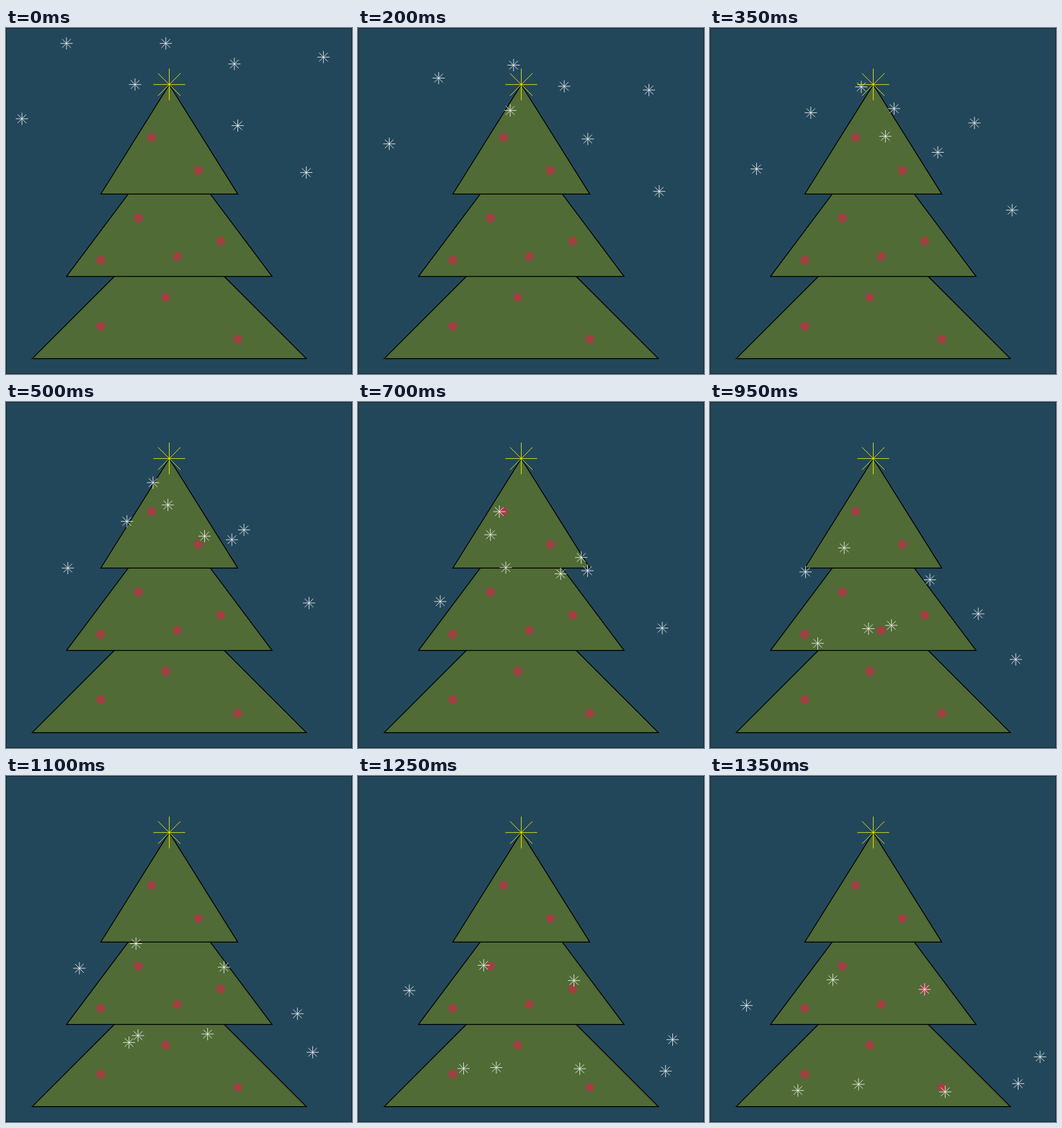
These frames come from a looping animation (480x480 px, 1.5 s). An HTML page with a canvas:

```html
<!DOCTYPE html>
<html>
<head>
<meta charset="utf-8">
<style>
  html, body { margin: 0; height: 100%; overflow: hidden; background: #23475a; }
  canvas { display: block; }
</style>
</head>
<body>
<canvas id="stage" width="480" height="480"></canvas>
<script>
const ctx = document.getElementById('stage').getContext('2d');
const LOOP = 1500, STEP = 50, STEPS = 26;

// Plot units: the tree is 80 wide and 80 high, its lower left corner at 0, 0
const UNIT = 480 / 101, TREE = 80;
const px = x => 36.4 + x * UNIT;
const py = y => 458.6 - y * UNIT;
const mix = (a, b, p) => a + (b - a) * p;

const balls = [[34.8, 64.6], [48.5, 54.9], [31, 41], [55, 34.3], [42.3, 29.8],
               [20, 28.7], [39, 17.9], [20, 9.5], [60, 5.6]];
// Each flake falls along a straight line
const flakes = [
  { from: [10, 92], to: [61, 4.3] },
  { from: [39, 92], to: [28.2, 37] },
  { from: [59, 86], to: [3, 29.5] },
  { from: [85, 88], to: [18, 4.7] },
  { from: [30, 80], to: [88.7, 14.5] },
  { from: [-3, 70], to: [35.7, 6.5] },
  { from: [60, 68], to: [55, 34.2] },
  { from: [80, 54.3], to: [82.3, 6.7] }
];

function polygon(points) {
  ctx.beginPath();
  for (const [x, y] of points) ctx.lineTo(px(x), py(y));
  ctx.closePath();
  ctx.fill();
  ctx.stroke();
}

function asterisk(x, y, r, color) {
  ctx.strokeStyle = color;
  ctx.lineWidth = 0.75;
  ctx.beginPath();
  for (let i = 0; i < 4; i++) {
    const dx = r * Math.cos(i * Math.PI / 4), dy = r * Math.sin(i * Math.PI / 4);
    ctx.moveTo(px(x) - dx, py(y) - dy);
    ctx.lineTo(px(x) + dx, py(y) + dy);
  }
  ctx.stroke();
}

function drawTree() {
  ctx.fillStyle = '#506b35';
  ctx.strokeStyle = '#000';
  ctx.lineWidth = 1.25;
  for (let tier = 0; tier < 3; tier++) {
    const inset = 10 * tier, base = 24 * tier;
    const top = Math.min(base + 40, TREE);
    polygon([[inset, base], [TREE / 2, top], [TREE - inset, base]]);
  }

  ctx.fillStyle = '#a04042';
  for (const [x, y] of balls) {
    ctx.beginPath();
    ctx.arc(px(x), py(y), 6.2, 0, 2 * Math.PI);
    ctx.fill();
  }
  asterisk(TREE / 2, TREE, 22, '#ff0');
}

function draw(t) {
  const step = Math.min(STEPS, Math.max(0, Math.floor(t / STEP) - 1));
  const p = step / STEPS;

  ctx.fillStyle = '#23475a';
  ctx.fillRect(0, 0, 480, 480);
  ctx.strokeStyle = '#132a38';
  ctx.lineWidth = 1;
  ctx.strokeRect(0.5, 0.5, 479, 479);

  drawTree();
  for (const { from, to } of flakes) {
    asterisk(mix(from[0], to[0], p), mix(from[1], to[1], p), 8.5, '#fff');
  }
}

function tick() {
  draw(performance.now() % LOOP);
  requestAnimationFrame(tick);
}
tick();
</script>
</body>
</html>
```
